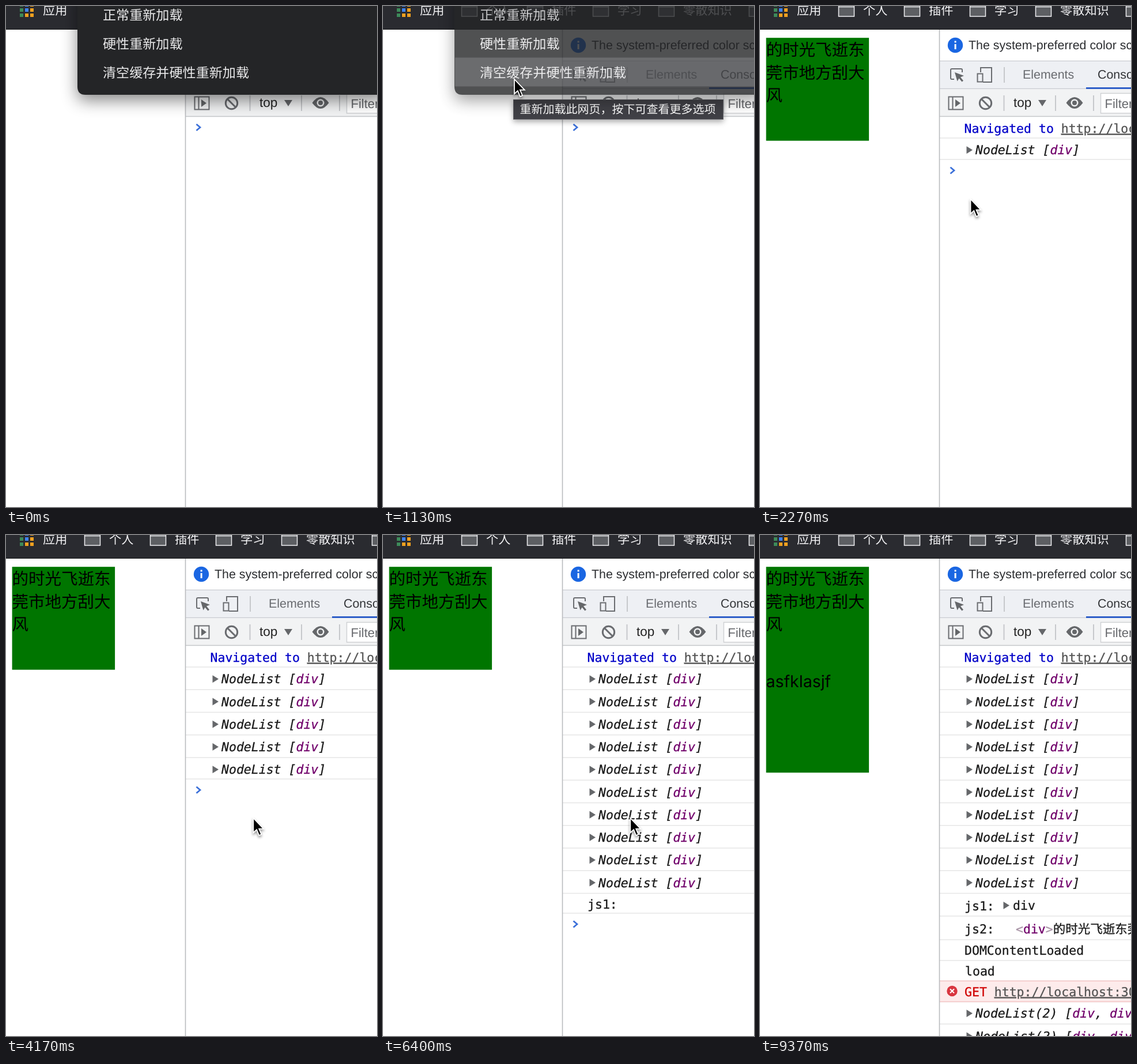
An HTML page for the animation above (9.41 s loop, 644 by 869 pixels).

```html
<!DOCTYPE html>
<html lang="zh">
<head>
<meta charset="utf-8">
<title>Console reload</title>
<style>
html, body { margin: 0; width: 100%; height: 100%; overflow: hidden; background: #fff; }
svg { display: block; width: 644px; height: 869px; }
text { white-space: pre; font-family: "Liberation Sans", Arial, sans-serif; font-size: 21.4px; text-rendering: geometricPrecision; }
.cjk text, text.cjk { font-family: "Noto Sans CJK SC", "Noto Sans CJK", sans-serif; }
#bookmarks text { font-size: 21.2px; }
#page text { font-size: 28.5px; }
#page #second { font-family: Inter, sans-serif; }
#menu text { font-size: 23.1px; }
#log text {
  font: 21.5px "DejaVu Sans Mono", "Noto Sans CJK SC", monospace;
  color: #1a1a1a; fill: currentColor; stroke: currentColor; stroke-width: .3;
}
#log .node { font-style: italic; }
.tag { color: #70006a; }
.dim { color: #a894a6; }
.nav { color: #0000c8; }
.error { color: #d00000; }
.link { color: #545454; text-decoration: underline; }
.line { fill: none; stroke: #6a6c70; stroke-width: 2; }
.bold { stroke-width: 3; }
.sep { stroke: #e6e6e6; stroke-width: 1.5; }
.split { stroke: #c6c8cb; stroke-width: 2; }
.solid { fill: #65676a; }
#menu { filter: drop-shadow(0 10px 14px #0007); }
#tip { filter: drop-shadow(0 4px 5px #0005); }
#cursor { filter: drop-shadow(0 3px 2px #0006); }
</style>
</head>
<body>
<svg viewBox="0 0 644 869">
  <rect width="644" height="869" fill="#fff"/>

  <g id="page" class="cjk">
    <rect id="box" x="10.6" y="55.2" width="178.5" fill="#007500"/>
    <text x="10.5" y="86">的时光飞逝东</text>
    <text x="10.5" y="126">莞市地方刮大</text>
    <text x="10.5" y="165">风</text>
    <text id="second" x="10.5" y="264">asfklasjf</text>
  </g>

  <rect width="644" height="41" fill="#2a2b30"/>
  <path d="M0 40.5H644" stroke="#18191b"/>
  <g id="bookmarks" class="cjk" fill="#f4f4f6"></g>

  <g id="panel">
    <path d="M312 95.5H644" stroke="#c9ccd1" stroke-width="1.5"/>
    <circle cx="339" cy="68" r="13.2" fill="#1a66e2"/>
    <path d="M337.6 66h3v9h-3zM337.6 60.5h3v3h-3z" fill="#fff"/>
    <text x="362" y="75" fill="#2b2d30">The system-preferred color scheme</text>

    <rect x="312" y="96" width="332" height="48" fill="#eef0f4"/>
    <path d="M312 143.5H644" stroke="#c9ccd1" stroke-width="1.5"/>
    <path d="M566 142.5H644" stroke="#2f5fc8" stroke-width="3"/>
    <path class="line" d="M337 127h-4q-2 0-2-2v-14q0-2 2-2h16q2 0 2 2v4"/>
    <path class="solid" d="M338 115l16 6-6 2.5 5 6-2.5 2-5-6-3 5z"/>
    <path class="line" d="M383 115v-8h19v25h-15"/>
    <path class="line" d="M377.5 117.5h9v14h-9z"/>
    <path class="split" d="M424 106v27"/>
    <text x="456" y="126" fill="#696b70">Elements</text>
    <text x="586" y="126" fill="#333538">Console</text>

    <rect x="312" y="144" width="332" height="47" fill="#f2f3f4"/>
    <path d="M312 191.5H644" stroke="#c4c6c9" stroke-width="1.5"/>
    <path class="line" d="M327.5 157.5h25v22h-25zM334.5 157v23"/>
    <path class="solid" d="M339 162l9 6.5-9 6.5z"/>
    <circle class="line bold" cx="391.5" cy="168.5" r="10.2"/>
    <path class="line bold" d="M384.5 161.5l14 14"/>
    <path class="split" d="M423.5 155v27M513 155v27M579 155v27"/>
    <text x="440" y="175" fill="#222" style="font-size:22.5px">top</text>
    <path class="solid" d="M483 163h14l-7 11z"/>
    <path class="solid" d="M531.5 168q14.5-20 29 0q-14.5 20-29 0z"/>
    <circle cx="546" cy="168" r="6.5" fill="#f2f3f4"/>
    <circle class="solid" cx="546" cy="168" r="4"/>
    <path d="M650 151.5H591.5V186H650" fill="#fff" stroke="#cfd1d4" stroke-width="1.5"/>
    <text x="598.5" y="177" fill="#66686c" style="font-size:22px">Filter</text>
  </g>

  <g id="log"></g>
  <path id="prompt" d="M330.5-5.5l6.5 5.5-6.5 5.5" fill="none" stroke="#3a6fd9" stroke-width="2.7"/>
  <path d="M311.5 41V869" stroke="#b9bbbe" stroke-width="1.6"/>

  <g id="tip">
    <rect x="226.5" y="162.5" width="364" height="34" fill="#404046" stroke="#64646a"/>
    <text class="cjk" x="237.5" y="186" fill="#fff" style="font-size:20px">重新加载此网页，按下可查看更多选项</text>
  </g>

  <g id="menu" class="cjk" fill="#e9e9ea">
    <path d="M660-30V154H138q-14 0-14-14V-30z" fill="#242527"/>
    <rect id="hover" x="125" width="525" height="50" fill="#46474a"/>
    <text x="168" y="24">正常重新加载</text>
    <text x="168" y="74">硬性重新加载</text>
    <text x="168" y="124">清空缓存并硬性重新加载</text>
  </g>

  <path id="cursor" d="M0 0V25.5L5.8 20L9.9 30L14 28.2L9.9 18.6H17.8Z" fill="#000" stroke="#fff" stroke-width="1.8"/>
</svg>

<script>
const LOOP = 9410;
const $ = id => document.getElementById(id);
const show = (el, on) => el.style.display = on ? '' : 'none';

// Bookmark bar
const [green, blue, amber] = ['#3d8b5a', '#3f83f0', '#f0a020'];
const dots = [green, blue, amber, green, blue, amber, green, amber, amber];
let bar = dots.map((c, i) =>
  `<rect x="${24 + i % 3 * 9}" y="${-5 + Math.floor(i / 3) * 9}" width="6" height="6" fill="${c}"/>`).join('');
bar += '<text x="64" y="15">应用</text>';
['个人', '插件', '学习', '零散知识', ''].forEach((name, i) => {
  const x = 136 + i * 114 + (i === 4 ? 43 : 0);
  bar += `<path d="M${x + .5}-6h27V18h-27zM${x} 1.5h28" fill="#5d5f63" stroke="#f0f0f2" stroke-width="1.5"/>
    <text x="${x + 43}" y="15">${name}</text>`;
});
$('bookmarks').innerHTML = bar;

// Console rows; "tight" is how much shorter a row is while it is the last one
const rows = [];
const text = (x, y, body, cls = '') => `<text x="${x}" y="${y}" class="${cls}">${body}</text>`;
const span = (cls, body) => `<tspan class="${cls}">${body}</tspan>`;
const arrow = (x, y) => `<path class="solid" d="M${x} ${y - 6.5}l10.5 6.5-10.5 6.5z"/>`;
const row = (at, end, body, tight = 0) => rows.push({ at, end, body, tight });
const div = span('tag', 'div');
const node = (at, y, label) =>
  row(at, y + 19, arrow(358.5, y + .5) + text(374, y + 8, label, 'node'), 2);

row(1480, 229, text(354.5, 219.5, span('nav', 'Navigated to ') + span('link', 'http://localhost:3000/')));
for (let i = 0; i < 10; i++) node(1850 + i * 500, 249.3 + i * 39.25, `NodeList [${div}]`);
row(6380, 661, `<g id="label">${text(355, 648, 'js1:')}</g>
  <g id="preview">${arrow(422.5, 642.5)}${text(439, 650, 'div')}</g>`, 5);
row(6730, 702, text(355, 691, 'js2:') +
  text(444, 691, span('dim', '&lt;') + div + span('dim', '&gt;') + '的时光飞逝东莞市地方刮大风'));
row(6730, 738, text(355, 728, 'DOMContentLoaded'));
row(6760, 773.5, text(356, 763.5, 'load'));
row(6800, 809.5, `<rect x="312" y="773" width="332" height="37" fill="#fdebeb"/>
  <path d="M312 773.5H644M312 809.5H644" stroke="#f3c4c4" stroke-width="1.5"/>
  <circle cx="333.5" cy="791" r="9.2" fill="#d93640"/>
  <path d="M330 787.5l7 7M337 787.5l-7 7" stroke="#fff" stroke-width="2"/>` +
  text(355, 799.5, span('error', 'GET ') + span('link', 'http://localhost:3000/favicon.ico')));
for (let i = 0; i < 2; i++) node(6850 + i * 500, 829.3 + i * 39.25, `NodeList(2) [${div}, ${div}]`);

$('log').innerHTML = rows.map(r => `<g><path class="sep" d="M312 ${r.end}H644"/>${r.body}</g>`).join('');
rows.forEach((r, i) => {
  r.el = $('log').children[i];
  r.sep = r.el.firstChild;
});

// Pointer stops: time, x, y
const stops = [
  [340, 180, -40], [600, 228, 127], [1850, 228, 127], [2200, 365.5, 335],
  [2830, 365.5, 335], [3250, 429.3, 491], [7250, 429.3, 491], [7550, 520, 880]
];
function pointer(t) {
  if (t <= stops[0][0]) return stops[0].slice(1);
  const i = stops.findIndex(s => s[0] > t);
  if (i < 0) return stops[stops.length - 1].slice(1);
  const [t0, x0, y0] = stops[i - 1], [t1, x1, y1] = stops[i];
  const p = (t - t0) / (t1 - t0), e = p * p * (3 - 2 * p);
  return [x0 + (x1 - x0) * e, y0 + (y1 - y0) * e];
}
const move = (el, x, y) => el.setAttribute('transform', `translate(${x} ${y})`);

function draw(t) {
  const [x, y] = pointer(t);
  move($('cursor'), x, y);

  const fade = Math.max(0, Math.min(1, (1330 - t) / 250));
  $('menu').style.opacity = fade;
  show($('menu'), fade > 0);
  show($('hover'), y > -10 && !(t > 930 && t < 1000));
  $('hover').setAttribute('y', y < 40 ? -10 : y < 90 ? 40 : 89.5);
  show($('tip'), t >= 1060 && t < 1870);

  const loaded = t >= 6700;
  show($('page'), t >= 1300);
  $('box').setAttribute('height', loaded ? 357 : 178.5);
  show($('second'), loaded);
  show($('preview'), loaded);
  move($('label'), 0, loaded ? 3 : 0);

  let end = 191.5, last = -1;
  rows.forEach((r, i) => { if (t >= r.at) last = i; });
  rows.forEach((r, i) => {
    show(r.el, i <= last);
    const cut = i === last ? r.tight : 0;
    move(r.sep, 0, -cut);
    if (i === last) end = r.end - cut;
  });
  move($('prompt'), 0, end + 19);
}

function tick() {
  draw(performance.now() % LOOP);
  requestAnimationFrame(tick);
}
tick();
</script>
</body>
</html>
```
